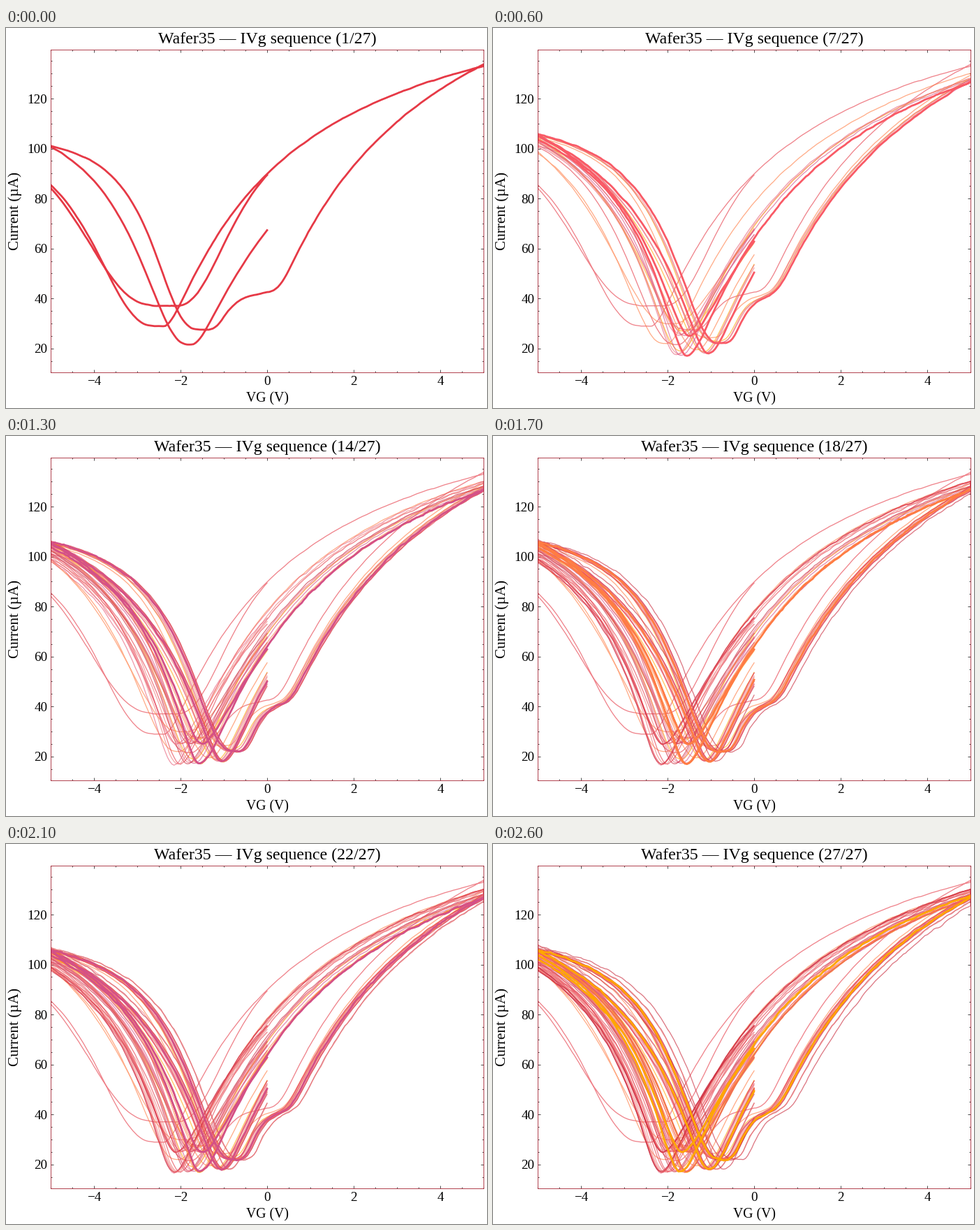
A matplotlib script that plays this animation: 689 px wide and 544 px high, repeating every 2.7 s.

```python
import numpy as np
import matplotlib.pyplot as plt
from matplotlib.animation import FuncAnimation
from matplotlib.ticker import MultipleLocator

W, H, DPI = 689, 544, 100
COUNT = 27
COLORS = ["#e63946", "#ff7c43", "#ffa600", "#f07a7a",
          "#e8607a", "#d45087", "#f95a66", "#c9283a"]

plt.rcParams["font.family"] = "Liberation Serif"

# Each leg is a dip (voltage, current) with a saturating rise on either side;
# a rise is (height, half-way distance, steepness).
# Every leg goes from its fresh shape to its settled one.
START = [((-1.75, 21.5), (100, 1.35, 1.7), (167, 3.9, 1)),
         ((-1.05, 18), (135, 2, 1), (167, 3.3, 1))]
UP = [((-1.45, 27.5), (80, 1.08, 2.2), (16, 0.35, 2)),
      ((-0.75, 22), (95, 1.17, 1.65), (21, 0.3, 2))]
DOWN = [((-2.4, 28.9), (80, 1.58, 2.3), (149, 3.06, 1)),
        ((-1.55, 17), (125, 1.4, 1), (167, 3.28, 1))]
END = [((-2.25, 37), (75, 2.03, 2.7), (80, 1.45, 2.1)),
       ((-1.5, 25), (125, 1.8, 1), (167, 4.2, 1))]


def lerp(a, b, t):
    return np.array(a) * (1 - t) + np.array(b) * t


def rise(d, height, half, power):
    """Saturating growth with distance d, rounded off near zero."""
    s = np.hypot(np.maximum(d, 0), 0.3) - 0.3
    return height * s ** power / (s ** power + half ** power)


def valley(x, shapes, settled, shift):
    (x0, y0), left, right = (lerp(a, b, settled) for a, b in zip(*shapes))
    d = x - x0 - shift
    return y0 + rise(-d, *left) + rise(d, *right)


def turn_on(x, settled, shift):
    """Second rise of the upward leg, after its shoulder."""
    d = x - lerp(0.3, 0.55, settled) - shift
    s = 0.1 * np.logaddexp(0, d / 0.1)
    return 167 * s / (s + lerp(4, 4.4, settled))


def sweep(k):
    rng = np.random.default_rng(40 + k)
    settled = 1 - np.exp(-0.9 * k)
    # The device partly recovers between short groups of sweeps.
    rest = np.sin(np.pi * (k - 5.9) / 3.85) ** 4 * (1 - np.exp(-k / 2))
    down = -rest * rng.uniform(0.15, 1.05)
    up = rest * (0.5 * rng.random() ** 2 - 0.12)

    left, full = np.linspace(0, -5, 101), np.linspace(-5, 5, 201)
    x = np.concatenate([left, full, full[::-1], left[::-1]])
    y = np.concatenate([
        valley(left, START, settled, up),
        valley(full, UP, settled, up) + turn_on(full, settled, up),
        valley(full[::-1], DOWN, settled, down),
        valley(left[::-1], END, settled, down)])
    noise = rng.normal(0, min(0.1 + 0.02 * k, 0.34), len(x) + 2)
    return x, y + np.convolve(noise, np.ones(3) / 3, "valid")


fig = plt.figure(figsize=(W / DPI, H / DPI), dpi=DPI, facecolor="white")
ax = fig.add_axes([64 / W, 51 / H, 620 / W, 462 / H])
ax.set_xlim(-5, 5)
ax.set_ylim(10.4, 139.6)
ax.xaxis.set_major_locator(MultipleLocator(2))
ax.xaxis.set_minor_locator(MultipleLocator(0.5))
ax.yaxis.set_major_locator(MultipleLocator(20))
ax.yaxis.set_minor_locator(MultipleLocator(5))
ax.tick_params(which="both", direction="in", top=True, right=True, width=0.5)
ax.tick_params(which="major", length=3, labelsize=13.8, pad=3.5)
ax.tick_params(which="minor", length=1.5)
for spine in ax.spines.values():
    spine.set_color("#a3202f")
    spine.set_linewidth(0.6)


def label(x, y, text, size, **kw):
    return fig.text(x / W, 1 - y / H, text, size=size, ha="center", **kw)


title = label(374.5, 22, "", 17.2, va="baseline")
label(374.5, 535, "VG (V)", 14.2, va="baseline")
label(13, 262, "Current (µA)", 15.3, va="center", rotation=90)

lines = [ax.plot(*sweep(k), color=COLORS[k % len(COLORS)],
                 solid_joinstyle="round")[0] for k in range(COUNT)]


def update(n):
    for k, line in enumerate(lines):
        line.set_visible(k <= n)
        line.set_linewidth(2 if k == n else 0.95)
        line.set_alpha(1 if k == n else 0.62)
    title.set_text(f"Wafer35 — IVg sequence ({n + 1}/{COUNT})")
    return lines + [title]


anim = FuncAnimation(fig, update, frames=COUNT, interval=100,
                     repeat=True, repeat_delay=0, blit=False)
plt.show()
```
